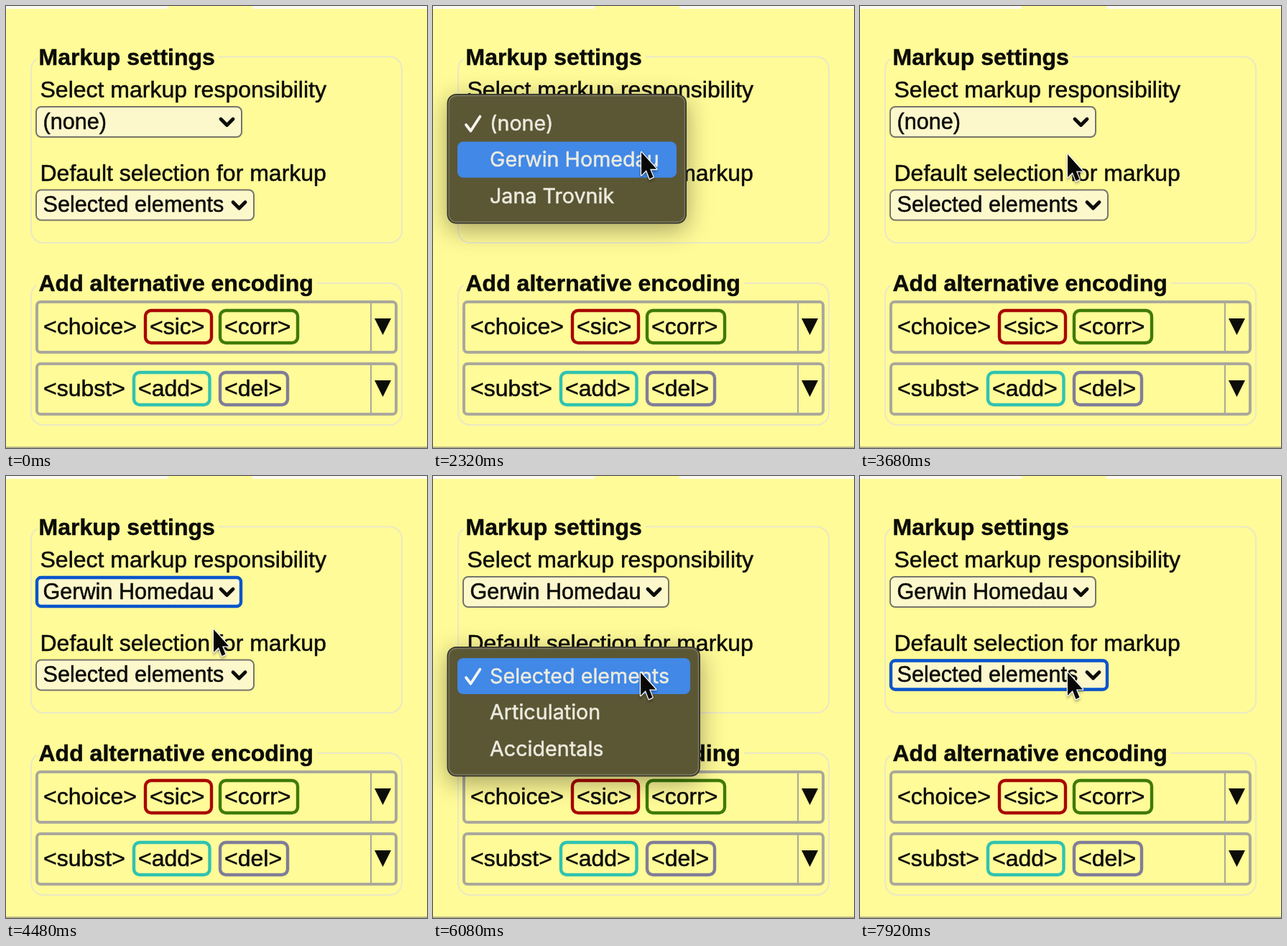
Recreate the animation shown at these times as an HTML page. Size 586 by 614 pixels, loop 8 s.

```html
<!DOCTYPE html>
<html lang="en">
<head>
<meta charset="utf-8">
<title>Markup settings</title>
<style>
  html, body { margin: 0; height: 100%; overflow: hidden; background: #fffb98; }
  svg { display: block; width: 586px; height: 614px; filter: blur(.6px); }
  text { font: 32px "Liberation Sans", Arial, sans-serif; fill: #0c0c08; stroke: #0c0c08; stroke-width: .5; white-space: pre; }
  .bold { font-weight: bold; }
  .value { font-size: 30.6px; }
  .frame { fill: none; stroke: #ebe8c6; stroke-width: 2; }
  .gap { fill: #fffb98; }
  .select { fill: #fdf8cc; stroke: #77756a; stroke-width: 2; }
  .ring { fill: none; stroke: #0a55cc; stroke-width: 4.4; }
  .chevron, .check { fill: none; stroke: #0c0c08; stroke-width: 4.8; stroke-linecap: round; stroke-linejoin: round; }
  .button { fill: none; stroke: #aaa89c; stroke-width: 4; }
  .chip { fill: none; stroke-width: 4.4; }
  .menu { filter: drop-shadow(0 8px 17px rgba(0, 0, 0, .36)); }
  .panel { fill: #5b5735; stroke: #37352a; stroke-width: 2; }
  .edge { fill: none; stroke: #7d7a60; stroke-width: 1.4; }
  .hover { fill: #4188e7; }
  .menu text { font: 28.7px Inter, sans-serif; fill: #ecebdf; stroke: #ecebdf; }
  .menu .check { stroke: #f6f5ee; stroke-width: 3.8; }
  #cursor { fill: #080808; stroke: #fff; stroke-width: 2.6; stroke-linejoin: round; paint-order: stroke;
    filter: drop-shadow(0 2px 2px rgba(0, 0, 0, .35)); }
</style>
</head>
<body>
<svg id="stage" viewBox="0 0 586 614"></svg>
<script>
const rect = (cls, x, y, right, bottom, r = 0, extra = '') =>
  `<rect class="${cls}" x="${x}" y="${y}" width="${right - x}" height="${bottom - y}" rx="${r}" ${extra}/>`;
const text = (str, x, y, cls = '', id = '') =>
  `<text x="${x}" y="${y}" class="${cls}" id="${id}">${str.replace(/</g, '&lt;').replace(/>/g, '&gt;')}</text>`;

const fieldset = (title, top, bottom, gapEnd) =>
  rect('frame', 35, top, 551, bottom, 17) + rect('gap', 42, top - 3, gapEnd, top + 3) +
  text(title, 45.5, top + 11, 'bold');

const select = (n, y, right, value) =>
  rect('select', 42, y, right, y + 42, 7) +
  rect('ring', 43, y + 1, right - 1, y + 41, 6, `id="ring${n}"`) +
  text(value, 51.5, y + 30.5, 'value', 'value' + n) +
  `<path class="chevron" d="M${right - 29} ${y + 17}l8.5 8.5l8.5 -8.5"/>`;

const button = (y, label, chips) =>
  rect('button', 43, y + 2, 543, y + 72, 5) +
  `<path d="M508 ${y + 3}v68" stroke="#aaa89c" stroke-width="2"/>` +
  `<path d="M513 ${y + 25}h23l-11.5 23z" fill="#0c0c08"/>` +
  text(label, 52, y + 47) +
  chips.map(([tag, x, right, color]) =>
    rect('chip', x + 2, y + 14, right - 2, y + 59, 8, `stroke="${color}"`) +
    text(tag, x + 8, y + 47)).join('');

const menu = (n, y, right, items) =>
  `<g class="menu" id="menu${n}">` +
  rect('panel', 20.5, y, right, y + 178.5, 12) + rect('edge', 22, y + 1.5, right - 1.5, y + 177, 10.5) +
  rect('hover', 34, y + 15, right - 13, y + 65, 8, `id="hover${n}"`) +
  `<path class="check" d="M46 ${y + 42}l6.5 8.5l13 -20"/>` +
  items.map((item, i) => text(item, 79, y + 50 + i * 50.4)).join('') + '</g>';

const person = 'Gerwin Homedau';
document.getElementById('stage').innerHTML =
  rect('top', 0, 0, 225, 4, 0, 'fill="#fafaf0"') + rect('top', 343, 0, 586, 4, 0, 'fill="#fafaf0"') +
  rect('bottom', 0, 612, 586, 614, 0, 'fill="#b9b68a"') +
  fieldset('Markup settings', 70.5, 329, 296) +
  text('Select markup responsibility', 47.5, 127) +
  select(1, 140, 328, '(none)') +
  text('Default selection for markup', 47.5, 242.5) +
  select(2, 255.5, 345, 'Selected elements') +
  fieldset('Add alternative encoding', 385, 582, 433) +
  button(409, '<choice>', [['<sic>', 192, 288, '#a80800'], ['<corr>', 296, 408, '#3f7a08']]) +
  button(495, '<subst>', [['<add>', 176, 285.5, '#2fc3b0'], ['<del>', 296, 394, '#807d98']]) +
  menu(1, 123, 352, ['(none)', person, 'Jana Trovnik']) +
  menu(2, 238, 371, ['Selected elements', 'Articulation', 'Accidentals']) +
  '<path id="cursor" d="M0 0V32L7.5 25L12.5 37L18 34.5L13 23.5H23Z"/>';

const el = id => document.getElementById(id);
const show = (id, visible) => el(id).style.visibility = visible ? 'visible' : 'hidden';
const clamp = v => Math.max(0, Math.min(1, v));
const ease = v => v * v * (3 - 2 * v);

// Cursor moves: start, end, from, to
const moves = [
  [240, 800, [560, 215], [308, 154]],
  [1840, 2400, [308, 154], [289, 206]],
  [4320, 5120, [289, 206], [289, 273]],
];

// The highlight blinks off once on the click, then the menu fades out.
function drawMenu(n, t, open, click) {
  const opacity = t < open ? 0 : 1 - clamp((t - click - 80) / 240);
  el('menu' + n).style.opacity = opacity;
  el('hover' + n).style.opacity = t >= click && t < click + 80 ? 0 : 1;
}

function draw(now) {
  const t = Math.floor(now % 8000 / 80) * 80;
  const [start, end, from, to] = moves.filter(m => t >= m[0]).pop() || moves[0];
  const k = ease(clamp((t - start) / (end - start)));
  const [x, y] = from.map((v, i) => v + (to[i] - v) * k);
  el('cursor').setAttribute('transform', `translate(${x} ${y}) scale(.92 1)`);
  show('cursor', t >= 320);

  drawMenu(1, t, 1440, 3360);
  drawMenu(2, t, 5280, 6240);
  el('hover1').setAttribute('transform', `translate(0 ${t >= 1840 && y > 187 ? 50.4 : 0})`);

  el('value1').textContent = t < 3760 ? '(none)' : person;
  show('ring1', t >= 3760 && t < 5200);
  show('ring2', t >= 6640);
  requestAnimationFrame(draw);
}
requestAnimationFrame(draw);
</script>
</body>
</html>
```
